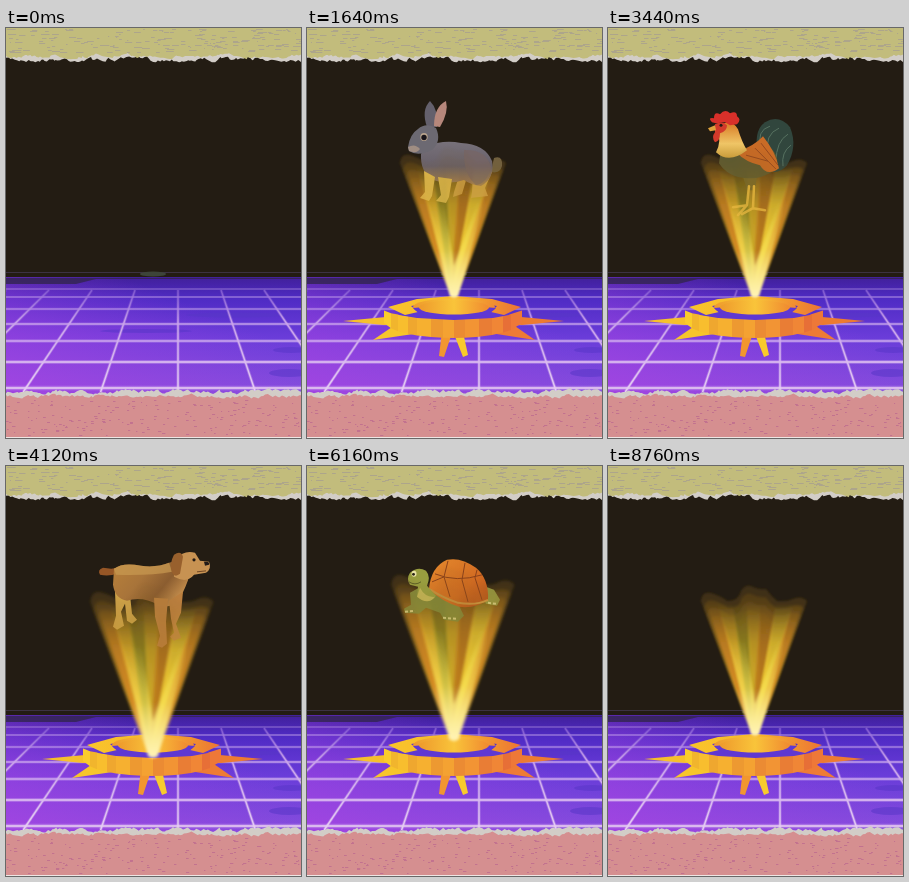
Write an HTML page that moves like this. It is 295 px wide and 410 px high and loops after 8.8 s.

```html
<!DOCTYPE html>
<html lang="en">
<head>
<meta charset="utf-8">
<title>Hologram animals</title>
<style>
html, body { margin: 0; width: 100%; height: 100%; overflow: hidden; background: #231c13; }
svg { display: block; width: 100%; height: 100%; }
.animal { display: none; }
</style>
</head>
<body>
<svg viewBox="0 0 295 410" preserveAspectRatio="none">
  <defs>
    <linearGradient id="floorDepth" x2="0" y2="1">
      <stop offset="0" stop-color="#41209a"/><stop offset=".18" stop-color="#4f2bc4"/>
      <stop offset=".5" stop-color="#6a3cd9"/><stop offset="1" stop-color="#7e50dc"/>
    </linearGradient>
    <linearGradient id="floorSide" x1="0" y1="1" x2=".7" y2=".3">
      <stop offset="0" stop-color="#a843e2" stop-opacity=".85"/>
      <stop offset="1" stop-color="#a843e2" stop-opacity="0"/>
    </linearGradient>
    <linearGradient id="gridFade" gradientUnits="userSpaceOnUse" x1="0" y1="258" x2="0" y2="362">
      <stop offset="0" stop-color="#8b62d6" stop-opacity=".6"/>
      <stop offset=".35" stop-color="#c9a2ea"/><stop offset="1" stop-color="#e6cdf3"/>
    </linearGradient>
    <linearGradient id="gold"><stop offset="0" stop-color="#f9c52b"/><stop offset=".5" stop-color="#f8b82c"/><stop offset="1" stop-color="#ec7434"/></linearGradient>
    <linearGradient id="bowl"><stop offset="0" stop-color="#ee9a2c"/><stop offset=".5" stop-color="#f9c43a"/><stop offset="1" stop-color="#f08a30"/></linearGradient>
    <linearGradient id="beamBody" gradientUnits="userSpaceOnUse" x1="0" y1="-146" x2="0" y2="0">
      <stop offset="0" stop-color="#7b591b"/><stop offset=".4" stop-color="#a97c1c"/>
      <stop offset=".75" stop-color="#e8b42a"/><stop offset="1" stop-color="#fff6c0"/>
    </linearGradient>
    <linearGradient id="beamCore" gradientUnits="userSpaceOnUse" x1="0" y1="-95" x2="0" y2="0">
      <stop offset="0" stop-color="#f8e35a" stop-opacity="0"/><stop offset=".5" stop-color="#f8e35a" stop-opacity=".6"/>
      <stop offset="1" stop-color="#fff3b4"/>
    </linearGradient>
    <linearGradient id="fur" x2="0" y2="1"><stop offset="0" stop-color="#77717a"/><stop offset=".55" stop-color="#686069"/><stop offset="1" stop-color="#a47d50"/></linearGradient>
    <linearGradient id="hackle" x2="0" y2="1"><stop offset="0" stop-color="#d87a25"/><stop offset=".6" stop-color="#efc566"/><stop offset="1" stop-color="#c99c3b"/></linearGradient>
    <linearGradient id="coat" x2="1" y2=".5"><stop offset="0" stop-color="#b9813a"/><stop offset=".45" stop-color="#a8743a"/><stop offset=".75" stop-color="#8b5d30"/><stop offset="1" stop-color="#c08a4a"/></linearGradient>
    <linearGradient id="shell" x2="1" y2="1"><stop offset="0" stop-color="#e58a2d"/><stop offset=".6" stop-color="#d26b22"/><stop offset="1" stop-color="#a94d1b"/></linearGradient>
    <linearGradient id="scales" x2="0" y2="1"><stop offset="0" stop-color="#d9562c"/><stop offset=".55" stop-color="#dc6a2b"/><stop offset="1" stop-color="#b8801f"/></linearGradient>
    <filter id="soft" x="-20%" y="-20%" width="140%" height="140%"><feGaussianBlur stdDeviation="1.200"/></filter>
  </defs>

  <rect width="295" height="410" fill="#231c13"/>
  <path d="M0 244.500H295" stroke="#43384f" stroke-width=".8"/>
  <ellipse cx="147" cy="246" rx="13" ry="2.500" fill="#3d4439"/>
  <rect y="249" width="295" height="120" fill="url(#floorDepth)"/>
  <rect y="249" width="295" height="120" fill="url(#floorSide)"/>
  <path d="M0 250H295V251H90L70 256H0Z" fill="#33254f" opacity=".8"/>
  <g fill="#5836c8" opacity=".55">
    <ellipse cx="140" cy="303" rx="46" ry="2"/><ellipse cx="283" cy="345" rx="20" ry="4"/>
    <ellipse cx="230" cy="287" rx="50" ry="2.500"/><ellipse cx="285" cy="322" rx="18" ry="3"/>
  </g>
  <g id="grid" fill="none" stroke="url(#gridFade)"></g>
  <g id="paper"></g>
  <rect y="409" width="295" height="1" fill="#eee6e4"/>

  <g id="hologram" opacity="0">
    <path d="M36 293L79 289L92 296L77 297Z" fill="#f6c02c"/><path d="M257 293L214 289L202 296L215 297Z" fill="#ed7b31"/>
    <path d="M66 312L88 297L113 305Z" fill="#f7c52b"/><path d="M228 312L205 296L183 305Z" fill="#ee7b35"/>
    <path d="M132 328L135 303L145 305L137 329Z" fill="#f2962f"/><path d="M161 327L156 329L147 306L156 304Z" fill="#f8ca2d"/>
    <g id="wall"></g>
    <path d="M87 282H206L202 287L186 290L147 292L110 290L92 287Z" fill="#5f38d2"/>
    <path d="M81 279L110 271L147 268L185 271L214 279L197 287L184 284L190 278Q147 270 104 278L111 284L98 287Z" fill="url(#gold)"/>
    <ellipse cx="147" cy="279" rx="41" ry="8.500" fill="url(#bowl)"/>
    <path d="M106 280Q147 275 189 280Q180 291 147 290Q114 291 106 280Z" fill="#5f38d2"/>
    <ellipse cx="147" cy="279.500" rx="35" ry="7" fill="url(#bowl)"/>
    <g class="beam" id="beam"></g>

    <g class="animal">
      <path d="M187 130Q196 127 195 138Q193 146 184 144Z" fill="#71603f"/>
      <path d="M152 148L160 149L155 166L146 169L147 164ZM166 146L185 144L178 160L181 168L164 170L165 164Z" fill="#cb9e44"/>
      <path d="M118 119Q136 111 154 115Q178 116 185 133Q188 150 174 158Q164 157 157 152Q142 157 126 152Q113 144 114 126Z" fill="url(#fur)"/>
      <path d="M157 122Q179 121 184 139Q180 156 169 157Q156 146 157 122Z" fill="#786564" opacity=".7"/>
      <path d="M117 143L128 149L125 168L122 173L113 170L118 164ZM131 149L145 151L142 169L139 175L129 173L134 167Z" fill="#dfb94e"/>
      <path d="M120 99Q114 82 123 73Q132 82 130 99Z" fill="#64606c"/>
      <path d="M127 98Q127 79 139 73Q142 84 133 99Z" fill="#b6877b"/>
      <path d="M101 119Q103 106 111 101Q119 94 129 100Q135 113 125 122Q111 129 102 123Z" fill="#6c6972"/>
      <path d="M101 119Q108 115 113 121Q110 126 102 123Z" fill="#a08d82"/>
      <ellipse cx="117" cy="109" rx="3.700" ry="4" fill="#b9a48d"/><circle cx="117" cy="109.500" r="2.700" fill="#19151a"/>
    </g>

    <g class="animal">
      <path d="M151 133Q144 105 157 96Q171 88 182 101Q190 120 179 139Q171 148 162 145Z" fill="#31463d"/>
      <path d="M153 123Q148 104 162 100M160 129Q156 108 171 102M168 136Q168 115 180 108M175 140Q173 126 183 119" fill="none" stroke="#567160" stroke-width="1"/>
      <path d="M134 147L149 150L147 164H139Z" fill="#75662a"/>
      <path d="M141 160L139 179M146 160L145 182M139 179L125 181M139 179L130 189M145 182L157 184M145 182L134 188" fill="none" stroke="#e6b63f" stroke-width="2.500" stroke-linecap="round"/>
      <path d="M113 122Q127 128 144 121Q153 114 164 123Q174 134 165 145Q153 153 139 152Q120 151 111 137Z" fill="#5e5a30"/>
      <path d="M128 126Q146 120 155 110Q168 126 171 142Q159 151 152 139Q138 136 128 126Z" fill="#c96b26"/>
      <path d="M138 129L160 135M147 122L168 143M153 117L170 139" stroke="#96491f" stroke-width="1"/>
      <path d="M109 101Q123 91 130 103Q134 116 139 124Q121 138 108 126Q114 115 109 101Z" fill="url(#hackle)"/>
      <path d="M104 96Q99 91 106 92Q106 85 112 88Q117 82 122 87Q129 84 129 90Q134 93 129 98L122 99L117 96L108 97Z" fill="#d8302a"/>
      <path d="M107 98Q114 94 119 99Q119 105 112 107Q112 115 107 116Q103 111 107 106Z" fill="#d23a2b"/>
      <path d="M107 99L100 102L102 105L108 104Z" fill="#dfa23d"/><circle cx="113" cy="99" r="1.500" fill="#241b15"/>
    </g>

    <g class="animal">
      <path d="M113 107Q104 111 94 109Q91 104 97 102Q108 104 115 101Z" fill="#965626"/>
      <path d="M109 126L124 129L126 148L131 154L126 158L121 155L119 138L115 146L118 160L111 164L107 161L110 150Z" fill="#cda148"/>
      <path d="M108 103Q117 96 135 100Q151 102 163 97L174 94L184 108Q180 122 173 134Q164 144 152 139Q136 130 121 135Q109 133 107 119Z" fill="url(#coat)"/>
      <path d="M108 103Q117 96 135 100Q151 102 163 97L166 106Q145 110 110 109Z" fill="#c99a52" opacity=".7"/>
      <path d="M148 132L162 133L160 156L161 178L156 182L151 180L154 170L149 151ZM163 135L177 126L175 147L170 158L175 172L168 175L164 171L168 167L165 153Z" fill="#bb7f3f"/>
      <path d="M170 93Q178 84 189 87L194 95L203 96Q206 103 200 107L188 109Q181 118 168 111Z" fill="#c79252"/>
      <path d="M168 89Q175 84 177 91L174 108Q169 112 166 107Q163 98 168 89Z" fill="#98602d"/>
      <path d="M198 96Q204 95 203 99L199 100Z" fill="#211a18"/><circle cx="188" cy="94" r="1.600" fill="#241b15"/>
      <path d="M191 106L200 105" stroke="#704622"/>
    </g>

    <g class="animal">
      <path d="M176 120L187 124L193 134L190 140L179 138L176 132Z" fill="#91923f"/>
      <path d="M119 121L137 132L151 138L157 150L151 156L137 154L133 147L119 142L112 148L98 147L97 143L104 139L103 127L112 122Z" fill="#80873a"/>
      <path d="M122 123Q124 101 140 94Q154 91 169 102Q182 113 181 134Q169 143 152 141Q135 136 122 123Z" fill="url(#shell)"/>
      <path d="M122 123Q136 132 151 137Q169 140 181 134" fill="none" stroke="#c9913f" stroke-width="2"/>
      <path d="M128 108Q149 117 175 109M141 95L137 111L143 131M158 97L155 114L161 136M170 104L168 112L175 134M137 111L125 116" fill="none" stroke="#8b411a" stroke-width="1"/>
      <path d="M103 107Q111 100 119 105Q124 111 120 120L129 130Q122 140 110 131L111 121L103 119Q99 113 103 107Z" fill="#989d3f"/>
      <path d="M113 122Q118 132 128 131Q121 140 110 131Z" fill="#c1b558"/>
      <ellipse cx="107" cy="108" rx="2.500" ry="3" fill="#e9e3a5"/><circle cx="106.500" cy="108.500" r="1.400" fill="#252015"/>
      <path d="M102 116Q108 120 114 116" fill="none" stroke="#5d6127"/>
      <path d="M98 146L108 145M136 152L151 153M181 137L190 138" stroke="#d2cc83" stroke-width="2" stroke-dasharray="3 2"/>
    </g>

    <g class="animal">
      <path d="M157 128Q169 120 178 106Q187 103 188 111Q183 118 189 125Q190 140 181 151Q174 153 170 143Q165 136 157 134Z" fill="#bf6c24"/>
      <path d="M162 128L181 110M163 130L187 124M163 131L181 145" stroke="#86401d"/>
      <path d="M123 112Q127 104 138 105Q147 106 146 111L140 110L151 119L131 121Z" fill="#a44d20"/>
      <path d="M104 146Q109 132 111 122Q121 108 139 111Q157 114 161 129Q161 147 148 156Q127 160 109 153L104 150L111 147Z" fill="url(#scales)"/>
      <path d="M111 122Q118 110 132 111Q139 123 134 141Q126 151 112 148Q107 135 111 122Z" fill="#e34b35" opacity=".75"/>
      <path d="M135 151Q144 139 150 144Q149 153 139 154Z" fill="#dfa33a"/>
      <ellipse cx="122" cy="131" rx="6" ry="6.500" fill="#d2b33d"/><ellipse cx="121.500" cy="131" rx="3.800" ry="5" fill="#211a16"/><circle cx="120" cy="129" r="1.200" fill="#f1e9c8"/>
      <path d="M116 125Q122 121 129 126" fill="none" stroke="#3c2015" stroke-width="1.500"/>
      <path d="M104 148L111 147" stroke="#742719" stroke-width="1.500"/>
    </g>
    <use href="#beam" opacity=".25"/>
  </g>
</svg>
<script>
const LOOP = 8800, STEP = 55, STEPS_PER_ANIMAL = 32;
const byId = id => document.getElementById(id);
const path = (d, fill, extra = '') => `<path d="${d}" fill="${fill}" ${extra}/>`;

let seed = 7;
const random = () => (seed = seed * 16807 % 2147483647) / 2147483647;

// Floor grid converging above the horizon; a wide faint stroke adds the glow
const rows = [261, 269, 281, 296, 313, 334, 360];
const glowing = (d, width, color = 'url(#gridFade)', opacity = 1) =>
  `<g stroke="${color}" opacity="${opacity}"><path d="${d}" stroke-width="${width * 2.2}" opacity=".35"/><path d="${d}" stroke-width="${width}"/></g>`;
let grid = rows.map((y, i) => glowing(`M0 ${y}H295`, .7 + i * .22, '#dcbcf0', .5 + i * .08)).join('');
for (let k = -5; k <= 4; k++)
  grid += glowing(`M${172 + k * 43} 262L${172.01 + k * 77.4} 364`, 1.4);
byId('grid').innerHTML = grid;

// Torn paper strips
function torn(edge, base, spread, fill) {
  let d = `M0 ${edge}`, y = base;
  for (let x = 0; x < 298; x += 1 + random() * 2) {
    y += (base - y) * .3 + (random() - .5) * spread;
    d += `L${x.toFixed(1)} ${y.toFixed(1)}`;
  }
  return path(d + `V${edge}Z`, fill);
}
function specks(count, top, height, color, maxWidth) {
  let d = '';
  for (let i = 0; i < count; i++)
    d += `M${Math.floor(random() * 295)} ${Math.floor(top + random() * height) + .5}h${(1 + random() * maxWidth).toFixed(1)}`;
  return `<path d="${d}" stroke="${color}" opacity=".65"/>`;
}
byId('paper').innerHTML =
  torn(0, 31.5, 3.6, '#d2cdc7') + torn(0, 28, 3, '#c2bc7c') + specks(190, 1, 24, '#a39a94', 7) +
  torn(410, 363.5, 3.6, '#d2cdc7') + torn(410, 368, 3, '#d58f90') + specks(190, 372, 36, '#b9648f', 2.5);

// Faceted front wall of the pedestal
const facets = [77, 84, 91, 101, 110, 124, 136, 147, 158, 172, 185, 196, 204, 215];
const curve = x => Math.sqrt(Math.max(0, 1 - ((x - 146) / 70) ** 2));
byId('wall').innerHTML = facets.slice(1).map((right, i) => {
  const left = facets[i], mix = i / 12, shade = i % 2 * 16;
  const color = `rgb(${250 - 12 * mix - shade / 2},${204 - 84 * mix - shade},${44 + 12 * mix})`;
  const top = x => 281 + 9 * curve(x), bottom = x => 292 + 18 * curve(x);
  return path(`M${left} ${top(left)}L${right} ${top(right)}V${bottom(right)}L${left} ${bottom(left)}Z`, color);
}).join('');

// Beam: outlines nested towards the tip give the stepped glow, with coloured rays inside
const outline = 'M-4 -1L-54 -133Q-53 -143 -44 -141Q-34 -138 -28 -133Q-16 -133 -14 -143Q-9 -151 -2 -147Q4 -144 11 -145Q16 -138 22 -133Q32 -132 38 -135Q46 -139 52 -133L4 -1Q0 3 -4 -1Z';
let beam = '<g filter="url(#soft)">';
for (let i = 0; i < 7; i++)
  beam += path(outline, 'url(#beamBody)', `opacity=".27" transform="scale(${1 - i * .055})"`);
const rays = [[-49, -37, '#d98a24'], [-37, -23, '#e6b92c'], [-23, -8, '#85851f'], [-8, 5, '#d3ad28'], [5, 21, '#b8741c'], [21, 38, '#f8da38'], [38, 48, '#d98a24']];
rays.forEach(([left, right, color], i) => {
  beam += `<linearGradient id="ray${i}" gradientUnits="userSpaceOnUse" x1="0" y1="-130" x2="0" y2="0">
    <stop offset="0" stop-color="${color}" stop-opacity="0"/><stop offset=".3" stop-color="${color}" stop-opacity=".6"/>
    <stop offset=".65" stop-color="${color}" stop-opacity=".85"/><stop offset="1" stop-color="#fff4b0"/></linearGradient>`
    + path(`M-3 0L${left} -130H${right}L3 0Z`, `url(#ray${i})`);
});
beam += path('M-4 0L-27 -95H-10L0 -30L24 -95H31L4 0Q0 3 -4 0Z', 'url(#beamCore)') + '</g>';
byId('beam').innerHTML = beam;

const poses = ['translate(147 268)', 'translate(147 273) scale(1.16)', 'translate(147 290) scale(1.16)'];
const bobs = [[6, 14], [2, 1], [4, 25], [4, 2], [5, 26]]; // lift, step of highest point
const animals = [...document.querySelectorAll('.animal')];
const hologram = byId('hologram'), beamGroup = byId('beam');

function draw(now) {
  const t = now % LOOP;
  const step = Math.min(159, Math.floor((t + 20) / STEP));
  const current = Math.floor(step / STEPS_PER_ANIMAL), local = step % STEPS_PER_ANIMAL;
  const last = local === STEPS_PER_ANIMAL - 1;
  hologram.setAttribute('opacity', t < 80 ? 0 : Math.min(1, .06 + (t - 80) / 1000));
  beamGroup.setAttribute('transform', poses[last ? 0 : local % 3]);
  animals.forEach((animal, i) => {
    animal.style.display = i === current && !last ? 'inline' : 'none';
  });
  const [lift, peak] = bobs[current];
  const dy = -lift * (1 + Math.cos(2 * Math.PI * (local - peak) / STEPS_PER_ANIMAL)) / 2;
  animals[current].setAttribute('transform', `translate(0 ${dy.toFixed(2)})`);
}

const start = performance.now();
function tick() {
  draw(performance.now() - start);
  requestAnimationFrame(tick);
}
tick();
</script>
</body>
</html>
```
